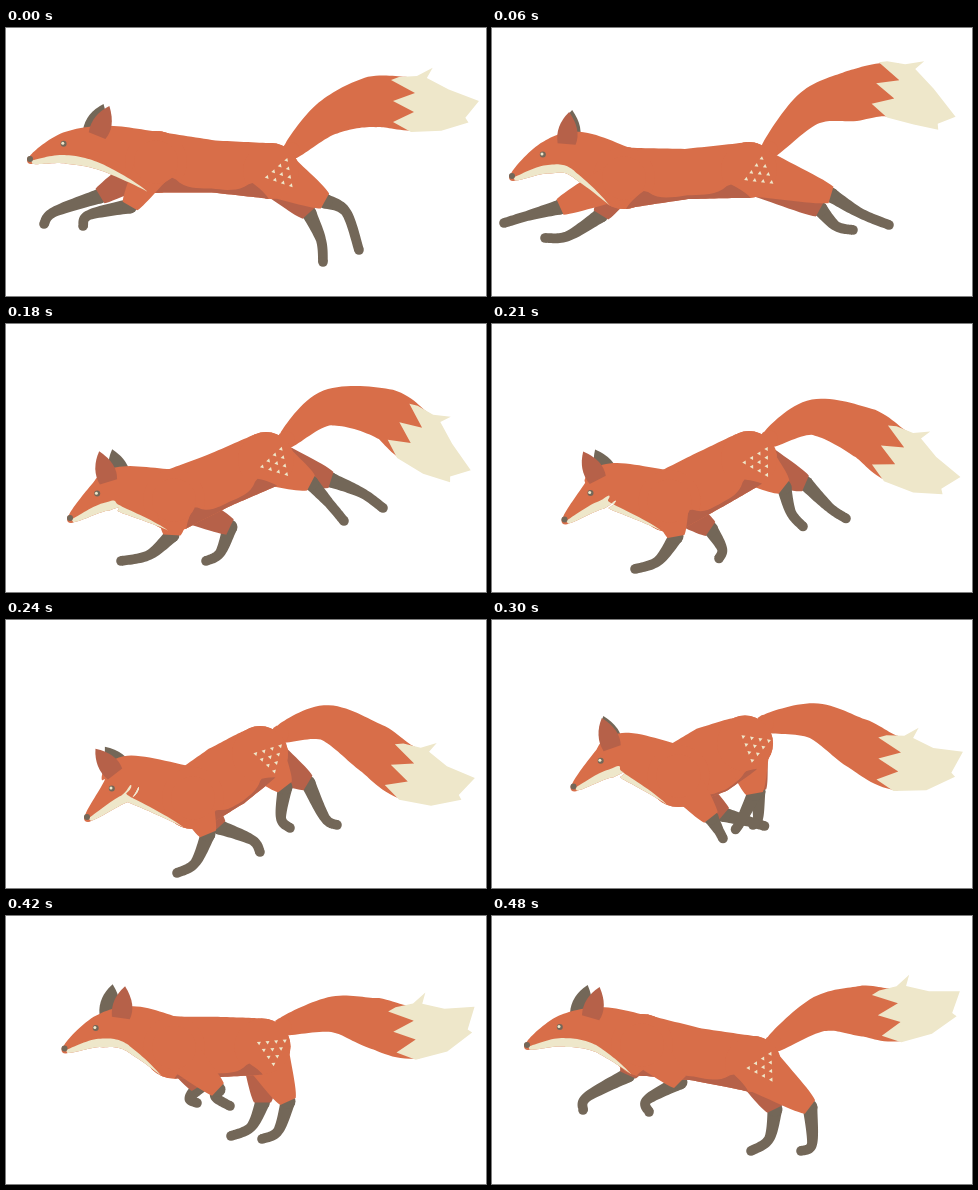
An HTML page with a canvas that plays this animation: 480 px wide and 268 px high, repeating every 0.54 s.

```html
<!DOCTYPE html>
<html lang="en">
<head>
<meta charset="utf-8">
<title>Running fox</title>
<style>
html, body { margin: 0; width: 100%; height: 100%; overflow: hidden; background: #fff; }
canvas { display: block; }
</style>
</head>
<body>
<canvas id="stage" width="480" height="268"></canvas>
<script>
const ctx = document.getElementById('stage').getContext('2d');
const ORANGE = '#d86e49', RUST = '#b66149', CREAM = '#eee7ca', DARK = '#736758';
const LOOP = 540;

// Joints of the rig in the seven key poses of the gallop.
const joints = {
  // nose, ear, chest, hip
  spine: ['25,132 93,103 150,134 265,143', '21,149 75,111 132,150 257,142',
    '40,174 90,137 145,167 264,153', '65,195 101,153 168,176 260,136',
    '82,198 106,150 187,178 254,134', '83,137 131,97 186,134 252,113',
    '36,130 100,97 150,129 261,148'],
  // two bends, end of the red fur, tip
  tail: ['322,90 366,74 409,76 473,74', '318,80 360,68 405,63 468,92',
    '314,92 360,79 413,91 470,128', '322,84 379,90 410,113 469,150',
    '320,103 366,128 405,154 470,159', '325,99 366,119 411,133 470,107',
    '328,98 370,95 408,98 469,76'],
  // legs: cuff, ankle, toe
  foreNear: ['124,178 83,187 77,198', '68,179 35,188 12,195', '105,207 70,216 47,224',
    '166,211 143,231 115,237', '202,214 189,243 171,253', '236,181 265,179 291,184',
    '188,166 155,184 157,196'],
  foreFar: ['94,168 48,184 38,196', '109,187 76,208 53,210', '170,200 148,231 125,240',
    '224,203 214,229 200,237', '213,207 246,220 254,232', '250,182 272,184 291,180',
    '136,159 95,181 91,194'],
  hindNear: ['319,173 340,184 353,222', '339,167 368,185 397,197', '328,170 365,164 408,181',
    '305,159 323,179 338,197', '279,167 275,198 284,208', '246,180 224,202 203,211',
    '318,191 320,228 309,235'],
  hindFar: ['303,185 315,212 317,234', '328,181 344,198 361,202', '338,170 362,191 383,201',
    '325,156 356,169 377,184', '302,163 319,198 331,205', '230,180 213,199 191,205',
    '283,193 277,223 259,235']
};
for (const name in joints)
  joints[name] = joints[name].map(s => s.split(' ').map(p => p.split(',').map(Number)));

// [start in ms, pose]; a half pose lies midway between its neighbours.
const steps = [[0, 0], [60, 1], [120, 2], [180, 3], [210, 3.5], [240, 4],
  [300, 4.5], [360, 5], [420, 5.5], [480, 6]];

const add = (a, b, k = 1) => [a[0] + b[0] * k, a[1] + b[1] * k];
const sub = (a, b) => add(a, b, -1);
const mix = (a, b, k) => add(a, sub(b, a), k);
const angleOf = v => Math.atan2(v[1], v[0]);
const polar = (angle, r) => [r * Math.cos(angle), r * Math.sin(angle)];

function poseAt(n) {
  const pose = {};
  for (const name in joints) {
    const [a, b] = [Math.floor(n), Math.ceil(n)].map(i => joints[name][i]);
    pose[name] = a.map((p, i) => mix(p, b[i], n % 1));
  }
  return pose;
}

// Samples a spline, with the normal and radius at each place.
function sample(pts, radii, next) {
  const out = [], N = 16;
  for (let i = 0; i < pts.length - 1; i++) {
    const a = pts[i], b = pts[i + 1];
    const m = mix([0, 0], sub(b, pts[i - 1] || a), 0.5);
    const n = mix([0, 0], sub(pts[i + 2] || next || b, a), 0.5);
    for (let j = i ? 1 : 0; j <= N; j++) {
      const t = j / N, ease = t * t * (3 - 2 * t);
      const p = add(add(mix(a, b, ease), m, t * (1 - t) ** 2), n, t * t * (t - 1));
      const d = add(add(mix([0, 0], sub(b, a), 6 * t * (1 - t)), m, (1 - t) * (1 - 3 * t)), n, t * (3 * t - 2));
      out.push({ p, angle: angleOf(d), r: radii[i] + (radii[i + 1] - radii[i]) * t });
    }
  }
  return out;
}

function fill(points, color) {
  ctx.fillStyle = color;
  ctx.beginPath();
  for (const p of points) ctx.lineTo(...p);
  ctx.fill();
}

function dot(p, r, color) {
  ctx.fillStyle = color;
  ctx.beginPath();
  ctx.arc(...p, r, 0, 7);
  ctx.fill();
}

// The part of a limb between two heights, from -1 (upper edge) to 1 (lower edge).
function band(path, from, to, color) {
  const edge = height => path.map((s, i) =>
    add(s.p, polar(s.angle + Math.PI / 2, s.r * height(i / (path.length - 1)))));
  fill([...edge(to), ...edge(from).reverse()], color);
}

function tube(path, color, flatEnd) {
  band(path, () => -1, () => 1, color);
  dot(path[0].p, path[0].r, color);
  if (!flatEnd) dot(path.at(-1).p, path.at(-1).r, color);
}

const shin = leg => tube(sample(leg, [7.5, 5, 4.8]), DARK);
const thigh = (root, leg, r, color) => tube(sample([root, leg[0]], [r, 8.5]), color, true);

function drawTail(root, tail) {
  const tip = tail[3];
  const path = sample([root, ...tail.slice(0, 3)], [9, 18, 25.5, 27], tip);
  tube(path, ORANGE, true);
  // The cream tip bends from the direction of the tail towards its end point.
  const { p, angle } = path.at(-1), turn = angleOf(sub(tip, p)) - angle;
  const outline = [[-24, -24], [-16, -27], [2, -28], [18, -36], [12, -26], [34, -14], [64, -1],
    [50, 15], [53, 20], [26, 27], [-4, 28], [-22, 18], [-1, 8], [-22, -3], [0, -11]];
  fill(outline.map(([u, v]) => {
    const a = angle + turn * Math.max(0, u) / 64;
    return add(add(p, polar(a, u)), polar(a + Math.PI / 2, v));
  }), CREAM);
}

function drawEar(at, angle, color) {
  ctx.save();
  ctx.translate(...at);
  ctx.rotate(angle);
  ctx.beginPath();
  ctx.moveTo(-9, 5);
  ctx.quadraticCurveTo(-13, -12, 0, -27);
  ctx.quadraticCurveTo(14, -10, 9, 5);
  ctx.fillStyle = color;
  ctx.fill();
  ctx.restore();
}

function drawSpeckles(at, angle) {
  ctx.save();
  ctx.translate(...at);
  ctx.rotate(angle);
  for (let row = 0; row < 4; row++)
    for (let i = 0; i <= row; i++) {
      const x = (i - row / 2) * 8.5, y = row * 7.5 - 14;
      fill([[x, y - 2], [x + 2, y + 1.5], [x - 2, y + 1.5]], CREAM);
    }
  ctx.restore();
}

function draw(time, pose) {
  const [nose, ear, chest, hip] = pose.spine;
  const brow = sub(ear, nose), headAngle = angleOf(brow), down = polar(headAngle + Math.PI / 2, 1);
  const eye = add(nose, [19 + brow[0] * 0.2, 4 + brow[1] * 0.7]);
  const earAngle = headAngle * 1.5 + 1;
  const sway = 13 * Math.sin((time - 40) / LOOP * 2 * Math.PI);

  // A gathered body is thicker in the middle and hides its belly.
  const length = Math.hypot(...sub(hip, chest));
  const belly = Math.max(0, Math.min(1, (length - 64) / 30));
  const torso = sample([chest, mix(chest, hip, 0.5), hip], [31, 20 + 8e4 / length ** 2, 28]);
  const head = sample([nose, add(eye, down, 5), add(ear, down, 19), chest], [4, 16, 23, 31]);

  ctx.clearRect(0, 0, 480, 268);
  shin(pose.hindFar);
  shin(pose.foreFar);
  thigh(hip, pose.hindFar, 25, RUST);
  thigh(chest, pose.foreFar, 20, RUST);
  shin(pose.hindNear);
  shin(pose.foreNear);
  drawTail(add(hip, [20, -20]), pose.tail);
  drawEar(add(ear, [sway, -2]), earAngle, DARK);
  tube(torso, ORANGE);
  thigh(hip, pose.hindNear, 28, ORANGE);
  tube(head, ORANGE);
  band(torso, s => 1 - belly * (s < 0.2 ? s * 2.7 : s > 0.8 ? (1 - s) * 2.7
    : 0.15 + 0.39 * ((s - 0.5) / 0.3) ** 4), () => 1, RUST);
  thigh(chest, pose.foreNear, 22, ORANGE);
  band(head, s => 1 - 0.85 * (1 - s), () => 1, CREAM);
  drawEar(ear, earAngle, RUST);
  dot(add(nose, [-1, -1]), 3, DARK);
  dot(eye, 3, DARK);
  dot(add(eye, [-0.8, -0.4]), 1.5, CREAM);
  drawSpeckles(add(hip, [11, 2]), angleOf(sub(pose.hindNear[0], hip)) - 0.17);
}

function tick() {
  const now = performance.now() % LOOP;
  const [time, pose] = steps.findLast(s => s[0] <= now);
  draw(time, poseAt(pose));
  requestAnimationFrame(tick);
}
tick();
</script>
</body>
</html>
```
